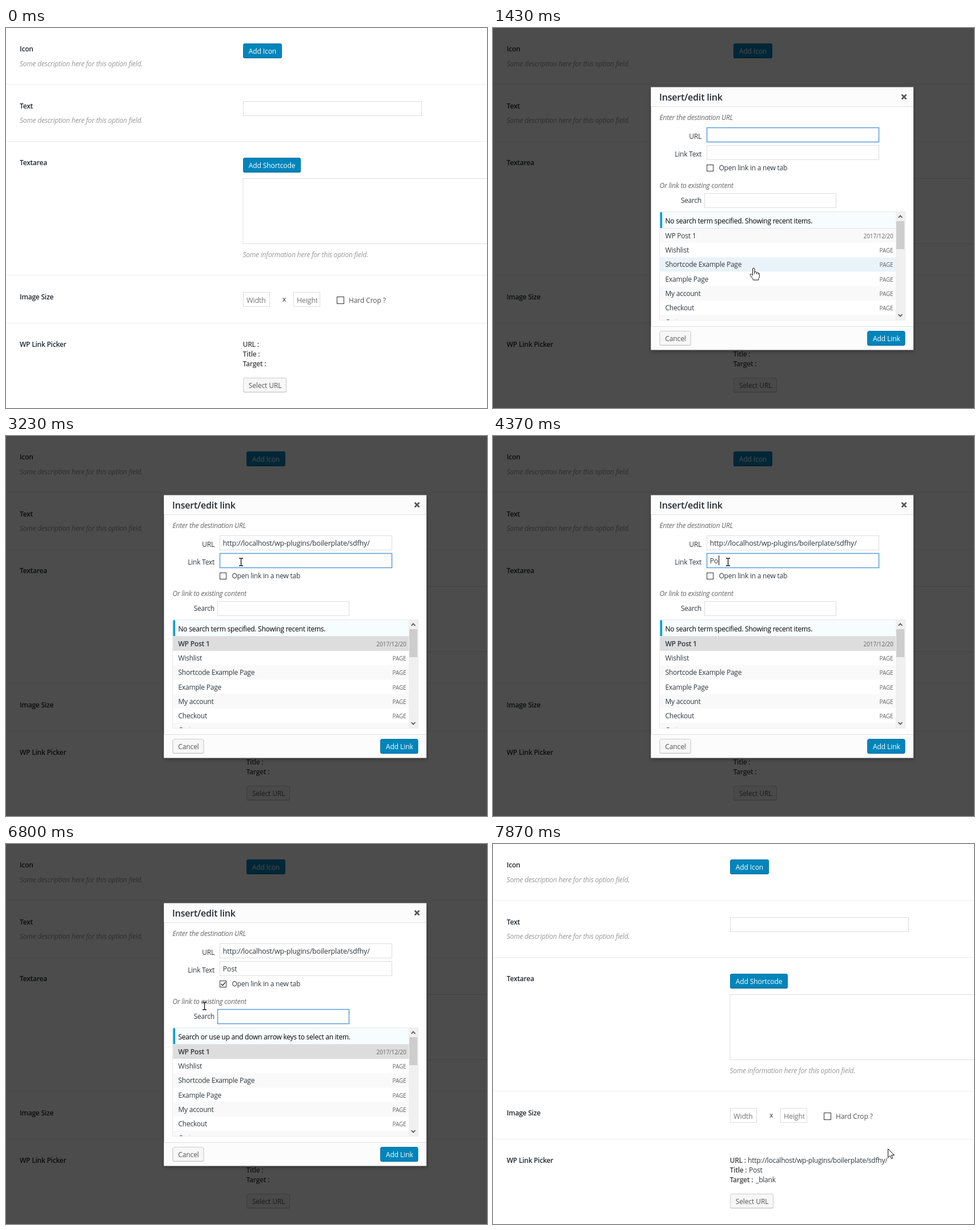
An HTML page for the animation above (8000 ms loop, 842 by 665 pixels).

```html
<!DOCTYPE html>
<html lang="en">
<head>
<meta charset="utf-8">
<title>Link picker</title>
<style>
html, body { margin: 0; width: 842px; height: 665px; overflow: hidden; background: #fff; }
svg { display: block; }
text { font: 12px "Open Sans", "Noto Sans", sans-serif; letter-spacing: -.23px; fill: #32373c; white-space: pre; }
.label { font-weight: 600; fill: #23282d; }
.key { font-weight: 600; fill: #444; }
.note { font-style: italic; letter-spacing: -.2px; fill: #999; }
.hint { font-style: italic; letter-spacing: -.2px; fill: #666; }
.title { font-size: 16px; font-weight: 600; letter-spacing: -.2px; fill: #23282d; }
.btn { letter-spacing: -.08px; fill: #555; }
.primary { letter-spacing: -.08px; fill: #fff; }
.typed { font-size: 12.6px; letter-spacing: -.23px; }
.ghost { font-size: 12.6px; letter-spacing: -.23px; fill: #777; }
.info { font-size: 10px; letter-spacing: -.12px; fill: #666; text-anchor: end; }
.right { text-anchor: end; }
.black { fill: #000; }
</style>
</head>
<body>
<svg id="stage" width="842" height="665" viewBox="0 0 842 665"></svg>
<script>
const LOOP = 8000;
const LINK = 'http://localhost/wp-plugins/boilerplate/sdfhy/';
const OPEN = 870, PICK = 2000, CHECK = 5530, SEARCH = 6130, CLOSE = 7800;
const ROW = 25.2;

const rect = (x, y, w, h, fill, more = '') =>
  `<rect x="${x}" y="${y}" width="${w}" height="${h}" fill="${fill}" ${more}/>`;
const text = (x, y, str, cls = '', more = '') =>
  `<text x="${x}" y="${y}" class="${cls}" ${more}>${str}</text>`;
const box = (x, y, w, h, stroke = '#ddd', more = '') =>
  rect(x + .5, y + .5, w - 1, h - 1, '#fff', `stroke="${stroke}" ${more}`);
const button = (id, x, y, w, label, primary) => {
  const [fill, edge, shadow] = primary ? ['#0085ba', '#0073aa', '#006799'] : ['#f7f7f7', '#ccc', '#ccc'];
  return rect(x, y + 1, w, 25, shadow, 'rx="3"') +
    rect(x + .5, y + .5, w - 1, 24.5, fill, `id="${id}" rx="2.5" stroke="${edge}"`) +
    text(x + 9.7, y + 18, label, primary ? 'primary' : 'btn');
};
const field = (id, x, y, w) => box(x, y, w, 26, '#ddd', `id="${id}"`);

// Settings page
const note = 'Some description here for this option field.';
const sections = [['Icon', 41, 98], ['Text', 141, 198], ['Textarea', 240, 432], ['Image Size', 475, 516], ['WP Link Picker', 558, 0]];
const details = [['URL :', 558, 446, LINK], ['Title :', 575, 448, 'Post'], ['Target :', 592, 460, '_blank']];
const page = rect(0, 0, 842, 665, '#fff') +
  sections.map(([name, y, line]) =>
    text(24, y, name, 'label') + (line ? rect(0, line, 842, 1, '#eee') : '')).join('') +
  text(24, 67, note, 'note') + text(24, 166, note, 'note') +
  '<g id="column">' +
  button('addIcon', 415, 27, 68, 'Add Icon', true) +
  box(415, 128, 313, 26) +
  button('addCode', 415, 227, 101, 'Add Shortcode', true) +
  box(414.5, 263, 460, 115) +
  text(414.5, 401, 'Some information here for this option field.', 'note') +
  box(415, 462, 47, 26) + text(421, 481, 'Width', 'ghost') +
  text(484, 479, 'x') +
  box(503, 462, 47, 26) + text(509, 481, 'Height', 'ghost', 'clip-path="url(#heightClip)"') +
  box(579, 470, 13, 13, '#333') + text(600, 481, 'Hard Crop ?', 'btn') +
  details.map(([k, y]) => text(414.5, y, k, 'key')).join('') +
  '<g id="values">' + details.map(([, y, x, v]) => text(x, y, v)).join('') + '</g>' +
  button('select', 415, 612, 76, 'Select URL') +
  '</g>';

// Link dialog
const names = ['WP Post 1', 'Wishlist', 'Shortcode Example Page', 'Example Page', 'My account', 'Checkout', 'Cart'];
const rows = names.map((name, i) => {
  const y = 351 + i * ROW, base = Math.round(y + 17);
  return rect(292.5, y, 412.5, ROW, '#fff', `id="row${i}"`) +
    text(301.5, base, name, '', `id="name${i}"`) +
    text(700.5, base, i ? 'PAGE' : '2017/12/20', 'info');
}).join('');
const chevron = (y, d) =>
  `<path d="M709.5 ${y + 2 * d}l3.5 ${-3.5 * d}l3.5 ${3.5 * d}" fill="none" stroke="#505050" stroke-width="1.7"/>`;
const dialog = '<g id="dialog">' +
  rect(0, 0, 842, 665, '#000', 'opacity=".7"') +
  rect(276.6, 103.7, 459.4, 459.5, '#fff', 'filter="url(#shade)"') +
  rect(276.6, 103.7, 459.4, 33.3, '#fcfcfc') + rect(276.6, 137, 459.4, 1, '#dfdfdf') +
  text(291, 127, 'Insert/edit link', 'title') +
  '<path d="M715.5 116.5l8 8m0-8l-8 8" stroke="#555" stroke-width="2.6"/>' +
  text(291.5, 161, 'Enter the destination URL', 'hint') +
  text(365, 194, 'URL', 'right') + field('url', 374, 174, 302) +
  text(379.5, 192, LINK, 'typed', 'id="urlText"') +
  text(365, 225, 'Link Text', 'right') + field('link', 374, 205, 302) +
  text(379.5, 223, '', 'typed', 'id="linkText"') +
  box(374, 239, 12, 12, '#333', 'id="check"') +
  '<path id="tick" d="M376.5 245l2.5 2.7l5-5.7" fill="none" stroke="#222" stroke-width="1.3"/>' +
  text(395.5, 249, 'Open link in a new tab') +
  text(291.5, 280, 'Or link to existing content', 'hint') +
  text(365, 306, 'Search', 'right') + field('search', 370, 289, 231) +
  box(291.4, 321.4, 430.2, 190.2, '#dfdfdf') +
  rect(292.5, 322.4, 412.5, 28, '#f7fcfe') + rect(292.5, 322.4, 3.7, 28, '#00a0d2') +
  rect(292.5, 350, 412.5, 1, '#e1e6e8') +
  text(301.5, 342, '', 'black', 'id="message"') +
  `<g clip-path="url(#listClip)">${rows}</g>` +
  rect(705, 322.4, 16, 188.6, '#f0f0f0') + rect(706, 338, 14, 49, '#cdcdcd') + chevron(330, 1) + chevron(503, -1) +
  rect(290.5, 320.5, 432, 192, 'none', 'id="ring" stroke="#555" stroke-dasharray="1 1"') +
  rect(276.6, 522, 459.4, 41.2, '#fcfcfc') + rect(276.6, 522, 459.4, 1, '#dfdfdf') +
  button('cancel', 291.5, 530, 55, 'Cancel') + button('add', 655.3, 530, 66, 'Add Link', true) +
  rect(0, 0, 1, 17, '#000', 'id="caret"') +
  '</g>';

const pointers =
  '<path id="arrow" d="M0 0V15.2L3.6 11.9L5.9 17.3L8.3 16.3L6 11H10.9Z" fill="#fff" stroke="#111" stroke-linejoin="round"/>' +
  '<g id="hand" fill="#fff" stroke="#111" stroke-linejoin="round"><path d="M-2 1.2Q-2-.4-.3-.4T1.4 1.2V6.2Q4.4 5.4 4.9 7.2Q7.3 6.6 7.8 8.4Q10.2 8.3 10 10.8V14Q10 16.5 8.3 18.2V20.5H-1.2V19Q-4 15.5-6.2 12.2Q-7 10.3-5.4 10Q-3.8 9.9-2 12.2Z"/>' +
  '<path d="M1.4 6.2V10M4.9 7.5V10.3M7.8 8.8V11" fill="none"/></g>' +
  '<path id="beam" d="M-3.5-6.5H-1L0-5.8L1-6.5H3.5M0-6V6M-3.5 6.5H-1L0 5.8L1 6.5H3.5" fill="none" stroke="#111" stroke-width="1.3"/>';

const stage = document.getElementById('stage');
stage.innerHTML = `<defs>
  <clipPath id="listClip"><rect x="292" y="351" width="413" height="160"/></clipPath>
  <clipPath id="heightClip"><rect x="504" y="463" width="41" height="24"/></clipPath>
  <filter id="shade" x="-5%" y="-5%" width="110%" height="110%">
    <feDropShadow dx="0" dy="3" stdDeviation="3" flood-opacity=".3"/></filter>
  </defs>${page}${dialog}${pointers}`;

const el = {};
stage.querySelectorAll('[id]').forEach(e => el[e.id] = e);
const set = (id, attrs) => { for (const k in attrs) el[id].setAttribute(k, attrs[k]); };
const show = (id, on) => set(id, { visibility: on ? 'inherit' : 'hidden' });
const label = (id, str) => { if (el[id].textContent !== str) el[id].textContent = str; };

// Pointer path: time, x, y of the hot spot
const path = [
  [0, 484, 690], [400, 484, 690], [570, 474, 617],
  [1100, 474, 617], [1430, 456, 420], [1800, 444, 364],
  [2070, 444, 364], [2530, 411, 220],
  [5100, 411, 220], [5270, 415, 250], [5370, 417, 243],
  [5670, 417, 243], [5980, 400, 302],
  [6570, 400, 302], [6800, 347, 283], [6850, 345, 278], [7240, 749, 536], [7590, 691, 533],
  [LOOP, 691, 533]
];
const keys = [4170, 4330, 4530, 4600];
const carets = [[900, 1430, 'url'], [2700, 3230, 'link'], [3770, 4870, 'link'], [SEARCH, 6660, 'search'], [7190, 7720, 'search']];
const caretAt = { url: [380, 178], link: [380, 209], search: [376, 293] };

// Smooth curve through the path that never overshoots a point
const slope = (i, c) => path[i] && path[i + 1]
  ? (path[i + 1][c] - path[i][c]) / (path[i + 1][0] - path[i][0]) : 0;
const tangent = (i, c) => {
  const a = slope(i - 1, c), b = slope(i, c);
  return a * b > 0 ? 2 * a * b / (a + b) : 0;
};
function pointerAt(t) {
  const i = path.findIndex(p => p[0] > t) - 1;
  const span = path[i + 1][0] - path[i][0], k = (t - path[i][0]) / span;
  return [1, 2].map(c => {
    const p = path[i][c], q = path[i + 1][c];
    return p + (q - p) * k * k * (3 - 2 * k) +
      span * k * (1 - k) * (tangent(i, c) * (1 - k) - tangent(i + 1, c) * k);
  });
}

function draw(t) {
  const [x, y] = pointerAt(t);
  const within = (l, top, r, b) => x >= l && x < r && y >= top && y < b;
  const between = (a, b) => t >= a && t < b;
  const open = between(OPEN, CLOSE);
  const picked = t >= PICK;

  show('dialog', open);
  show('values', t >= CLOSE);
  set('column', { transform: `translate(${open ? 6 : 0} 0)` });

  const overSelect = !open && within(415, 612, 491, 638);
  set('select', {
    stroke: between(800, 915) ? '#5b9dd9' : overSelect ? '#999' : '#ccc',
    fill: between(800, OPEN) ? '#eee' : overSelect ? '#fafafa' : '#f7f7f7'
  });

  const focus = between(900, 1930) ? 'url' : between(2700, 5370) ? 'link' : between(SEARCH, 7730) ? 'search' : '';
  for (const id of ['url', 'link', 'search']) {
    set(id, { stroke: id === focus ? '#5b9dd9' : '#ddd', 'stroke-width': id === focus ? 1.5 : 1 });
  }
  show('urlText', picked);
  label('linkText', 'Post'.slice(0, keys.filter(k => t >= k).length));
  label('message', t >= SEARCH ? 'Search or use up and down arrow keys to select an item.'
    : 'No search term specified. Showing recent items.');
  show('ring', between(1930, 2700));
  show('tick', t >= CHECK);

  const overLabel = open && within(374, 238, 516, 254);
  set('check', { stroke: overLabel ? '#0078d7' : '#333' });

  const hovered = open && within(292, 351, 705, 511) ? Math.floor((y - 351) / ROW) : -1;
  names.forEach((_, i) => {
    const chosen = picked && i === 0;
    set('row' + i, { fill: chosen ? '#ddd' : i === hovered ? '#eaf2fa' : i % 2 ? '#fff' : '#f9f9f9' });
    el['name' + i].style.fontWeight = chosen ? 600 : 400;
  });
  const overAdd = open && within(655, 530, 722, 557);
  set('add', { fill: t >= 7730 ? '#0073aa' : overAdd ? '#008ec2' : '#0085ba' });

  const caret = carets.find(([a, b]) => between(a, b));
  show('caret', !!caret);
  if (caret) {
    const [cx, cy] = caretAt[caret[2]];
    const shift = caret[2] === 'link' ? el.linkText.getComputedTextLength() : 0;
    set('caret', { x: Math.round(cx + shift), y: cy });
  }

  let kind = 'arrow';
  if (overSelect || hovered >= 0 || overAdd || overLabel) kind = 'hand';
  else if (open && (within(374, 174, 676, 200) || within(374, 205, 676, 231) ||
    within(370, 289, 601, 315) || within(291, 268, 721, 289))) kind = 'beam';
  for (const id of ['arrow', 'hand', 'beam']) show(id, id === kind);
  set(kind, { transform: `translate(${Math.round(x) + .5} ${Math.round(y) + .5})` });
}

const start = performance.now();
function tick() {
  draw((performance.now() - start) % LOOP);
  requestAnimationFrame(tick);
}
tick();
</script>
</body>
</html>
```
